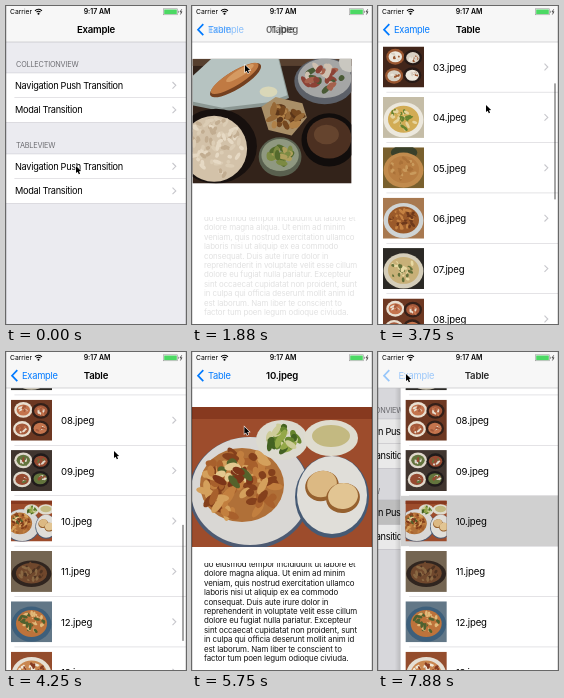
An HTML page with a canvas that plays this animation: 180 by 318 pixels, repeating every 8000 ms.

```html
<!DOCTYPE html>
<html lang="en">
<head>
<meta charset="utf-8">
<title>List transition</title>
<style>
html, body { margin: 0; width: 100%; height: 100%; overflow: hidden; background: #fff; }
canvas { display: block; width: 180px; height: 318px; }
</style>
</head>
<body>
<canvas id="stage"></canvas>
<script>
const W = 180, H = 318, LOOP = 8000, NAV = 36, ROW = 50.4, ROWS = 14, THUMB = 41;
const BLUE = '#007aff';
const canvas = document.getElementById('stage');
const dpr = window.devicePixelRatio || 1;
canvas.width = W * dpr;
canvas.height = H * dpr;
const g = canvas.getContext('2d');

const clamp = v => Math.max(0, Math.min(1, v));
const ease = v => { v = clamp(v); return v * v * (3 - 2 * v); };
const mix = (a, b, p) => a + (b - a) * p;

function rect(x, y, w, h, color) {
  g.fillStyle = color;
  g.fillRect(x, y, w, h);
}

function text(str, x, y, size, { color = '#000', weight = 400, gap = -0.2, align = 'left', alpha = 1 } = {}) {
  if (alpha <= 0) return;
  g.save();
  g.globalAlpha = Math.min(1, alpha);
  g.font = `${weight} ${size}px Inter, Roboto, sans-serif`;
  g.letterSpacing = gap + 'px';
  g.textAlign = align;
  g.textBaseline = 'alphabetic';
  g.fillStyle = color;
  g.fillText(str, x, y + size * 0.36);
  g.restore();
}

function line(points, color, width) {
  g.beginPath();
  points.forEach(([x, y]) => g.lineTo(x, y));
  g.strokeStyle = color;
  g.lineWidth = width;
  g.stroke();
}

function shape(points, color) {
  g.beginPath();
  points.forEach(([x, y]) => g.lineTo(x, y));
  g.fillStyle = color;
  g.fill();
}

function oval(x, y, rx, ry, color, turn = 0) {
  g.beginPath();
  g.ellipse(x, y, rx, ry, turn, 0, 7);
  g.fillStyle = color;
  g.fill();
}

const disclosure = y => line([[166.5, y - 3.3], [169.8, y], [166.5, y + 3.3]], '#c7c7cc', 1.1);

// Small scattered bits of food inside an ellipse
function bits(seed, n, x, y, rx, ry, size, colors) {
  const rnd = () => (seed = (seed * 16807) % 2147483647) / 2147483647;
  for (let i = 0; i < n; i++) {
    const a = rnd() * 6.283, r = Math.sqrt(rnd());
    oval(x + Math.cos(a) * r * rx, y + Math.sin(a) * r * ry, size * (0.6 + rnd()), size * 0.6, colors[i % colors.length], rnd() * 3);
  }
}

function fishMeal() {
  rect(0, 0, 180, 140, '#33231a');
  rect(0, 0, 180, 8, '#57402f');
  shape([[0, 22], [22, 0], [98, 0], [109, 44], [86, 53], [34, 59], [0, 52]], '#8b9793');
  shape([[0, 20], [22, 0], [97, 0], [107, 41], [84, 49], [34, 55], [0, 48]], '#b6c3c1');
  oval(49, 24, 33, 10, '#74401f', -0.55);
  oval(48, 22, 31, 8, '#c07a43', -0.55);
  oval(54, 16, 18, 4, '#d59a62', -0.55);
  oval(86, 37, 10, 6, '#d9d7b8');
  oval(149, 25, 34, 26, '#5c6068');
  oval(149, 22, 30, 22, '#a5a6a5');
  bits(9, 26, 147, 22, 21, 14, 5, ['#8c4236', '#cfc0b0', '#495a35', '#a5614c']);
  oval(177, 4, 12, 11, '#c9c7c0');
  shape([[78, 54], [94, 43], [124, 50], [129, 66], [112, 86], [86, 80]], '#a98f68');
  bits(4, 38, 103, 65, 18, 13, 5, ['#74471f', '#966836', '#5a3519', '#b08148']);
  oval(27, 98, 46, 42, '#17100e');
  oval(25, 101, 37, 37, '#d3c2a9');
  bits(7, 80, 24, 100, 33, 33, 3.5, ['#e6d9c4', '#c2ad91', '#dccdb5']);
  oval(99, 110, 24, 22, '#59604f');
  oval(99, 108, 21, 18, '#8f9880');
  bits(6, 26, 99, 108, 13, 10, 5, ['#546a2c', '#7c8a42', '#ae9f5c']);
  oval(154, 91, 31, 30, '#110d0c');
  oval(154, 89, 25, 23, '#4c3021');
  oval(151, 85, 14, 11, '#65442e');
}

function pastaMeal() {
  rect(0, 0, 180, 140, '#9d4c2c');
  rect(0, 0, 180, 12, '#87391f');
  oval(58, 86, 61, 56, '#4d5a72');
  oval(58, 84, 59, 54, '#d9d7d4');
  oval(50, 78, 42, 37, '#b07038');
  bits(11, 90, 49, 77, 38, 33, 6, ['#a8602c', '#d4a05c', '#84401c', '#c27f3f']);
  bits(3, 18, 42, 70, 18, 15, 6, ['#e3c88f', '#55622b', '#7c3519']);
  oval(90, 33, 26, 20, '#dcdacf');
  bits(5, 32, 90, 31, 18, 12, 5, ['#66852e', '#94a848', '#446222', '#cdcc98']);
  oval(139, 31, 27, 18, '#dfdccf');
  oval(139, 29, 19, 11, '#c3b981');
  oval(140, 90, 37, 41, '#465a74');
  oval(140, 88, 35, 39, '#e0ded9');
  oval(130, 79, 17, 15, '#96612f', -0.3);
  oval(130, 77, 15, 13, '#dcb983', -0.3);
  oval(151, 91, 17, 15, '#96612f', -0.2);
  oval(151, 89, 15, 13, '#e2c593', -0.2);
}

// table, plate, food, accent, accent
const dishes = {
  2: ['#50301f', '#d8d3cb', '#8b5a30', '#e4d8bd', '#58702f'],
  3: ['#42261a', '#261a16', '#d8d1c4', '#9a5730', '#ece7dc'],
  4: ['#c5bda7', '#ece8dd', '#d2ac55', '#67822f', '#e7d49d'],
  5: ['#79602e', '#c18b4d', '#b87e42', '#c99a5c', '#aa7138'],
  6: ['#a87950', '#cfd4d5', '#9b5a2a', '#6e391b', '#c58242'],
  7: ['#2b2925', '#d4cdb9', '#c8b078', '#e7d9a3', '#637039'],
  8: ['#6d3822', '#342019', '#a5593a', '#e9dfd0', '#c4744d'],
  9: ['#40352f', '#201b1b', '#964a31', '#dfd8cc', '#63743d'],
  11: ['#746552', '#30251f', '#70482d', '#4d3221', '#8a6843'],
  12: ['#627787', '#3d5f7b', '#bd733b', '#e0b979', '#4e612f'],
  13: ['#944d2d', '#e5dfd4', '#c9864f', '#f0e7d6', '#863b22'],
  14: ['#503a2c', '#cfc7b7', '#aa7444', '#d9ba7d', '#5e6d35']
};

function genericMeal(i) {
  const [table, plate, food, a, b] = dishes[i];
  rect(0, 0, 180, 140, table);
  if (i === 3 || i === 8 || i === 9) {
    [[62, 35], [122, 38], [58, 100], [120, 98]].forEach(([x, y], n) => {
      oval(x, y, 31, 27, n % 2 ? plate : a);
      oval(x, y, 23, 19, n % 3 ? food : b);
      bits(i + n + 1, 9, x, y, 16, 13, 6, [a, food, b]);
    });
    return;
  }
  if (i === 5) oval(92, 18, 45, 25, '#39402a');
  oval(90, 78, 68, i === 11 ? 45 : 60, plate);
  oval(90, 76, 53, i === 11 ? 35 : 46, food);
  bits(i * 31, 40, 90, 74, 44, i === 11 ? 26 : 36, 8, [food, a, b]);
}

function photo(i, x, y, w, h) {
  const k = Math.max(w / 180, h / 140);
  g.save();
  g.beginPath();
  g.rect(x, y, w, h);
  g.clip();
  g.translate(x + w / 2, y + h / 2);
  g.scale(k, k);
  g.translate(-90, -70);
  if (i === 1) fishMeal();
  else if (i === 10) pastaMeal();
  else genericMeal(i);
  g.restore();
}

function menu(pressed) {
  rect(0, NAV, W, H - NAV, '#ebebf0');
  [['COLLECTIONVIEW', 67], ['TABLEVIEW', 148]].forEach(([name, top], n) => {
    text(name, 10, top - 8.5, 7.3, { color: '#6d6d72' });
    rect(0, top, W, 49.2, '#fff');
    if (n && pressed) rect(0, top, W, 24.6, '#d0d0d0');
    rect(0, top - 0.3, W, 0.5, '#c8c7cc');
    rect(8.4, top + 24.4, W, 0.5, '#c8c7cc');
    rect(0, top + 49, W, 0.5, '#c8c7cc');
    ['Navigation Push Transition', 'Modal Transition'].forEach((label, r) => {
      const y = top + 12.3 + r * 24.6;
      text(label, 9, y, 9.2, { gap: -0.3 });
      disclosure(y);
    });
  });
}

const rowY = (i, scroll) => NAV + ROW * (i - 0.5) - scroll;

function list(scroll, selected, hidden) {
  rect(0, NAV, W, H - NAV, '#fff');
  for (let i = 1; i <= ROWS; i++) {
    const y = rowY(i, scroll);
    if (y < 5 || y > H + 30) continue;
    if (i === selected) rect(0, y - ROW / 2, W, ROW, '#d0d0d0');
    rect(8.4, y + ROW / 2 - 0.3, W, 0.5, '#c8c7cc');
    if (i !== hidden) photo(i, 5, y - THUMB / 2, THUMB, THUMB);
    text(String(i).padStart(2, '0') + '.jpeg', 55, y + 0.5, 9.6, { gap: -0.15 });
    disclosure(y);
  }
}

const body = [
  'do eiusmod tempor incididunt ut labore et',
  'dolore magna aliqua. Ut enim ad minim',
  'veniam, quis nostrud exercitation ullamco',
  'laboris nisi ut aliquip ex ea commodo',
  'consequat. Duis aute irure dolor in',
  'reprehenderit in voluptate velit esse cillum',
  'dolore eu fugiat nulla pariatur. Excepteur',
  'sint occaecat cupidatat non proident, sunt',
  'in culpa qui officia deserunt mollit anim id',
  'est laborum. Nam liber te conscient to',
  'factor tum poen legum odioque civiuda.'
];

function article(alpha) {
  g.save();
  g.beginPath();
  g.rect(0, 211, W, H);
  g.clip();
  body.forEach((s, n) => text(s, 12, 212.2 + n * 9.4, 7.9, { alpha, color: '#111', gap: -0.1 }));
  g.restore();
}

function title(str, x, alpha) {
  text(str, x, 23.5, 9.6, { weight: 600, align: 'center', alpha });
}

function back(str, x, alpha) {
  text(str, x, 23.7, 9.3, { color: BLUE, alpha, gap: -0.25 });
}

function chevron(alpha) {
  g.save();
  g.globalAlpha = clamp(alpha);
  line([[11.3, 18.2], [6, 23.7], [11.3, 29.2]], BLUE, 1.7);
  g.restore();
}

function statusBar() {
  text('Carrier', 4, 5.8, 6.75, { gap: 0 });
  text('9:17 AM', 91, 5.8, 6.9, { weight: 600, align: 'center', gap: 0 });
  g.strokeStyle = '#000';
  g.lineWidth = 1.1;
  [2.7, 4.7].forEach(r => {
    g.beginPath();
    g.arc(32.5, 8, r, -2.4, -0.75);
    g.stroke();
  });
  oval(32.5, 7.7, 1, 1, '#000');
  g.strokeStyle = '#8a8a8a';
  g.lineWidth = 0.5;
  g.strokeRect(157.5, 2.8, 14, 6);
  rect(158.2, 3.5, 12.6, 4.6, '#4cd964');
  rect(172, 4.8, 0.8, 2, '#8a8a8a');
  line([[175.7, 3.3], [174, 6], [176, 5.7], [174.4, 8.5]], '#222', 0.7);
}

const stops = [
  [0, 70, 160], [700, 70, 160], [1350, 53, 59], [1950, 53, 59], [2650, 20, 23], [3150, 20, 23],
  [3600, 108, 99], [4250, 108, 99], [4700, 101, 181], [5250, 101, 181], [6050, 30, 26],
  [6700, 30, 26], [7400, 28, 22], [8000, 28, 22]
];

function pointer(t) {
  const n = stops.findIndex(s => s[0] > t);
  const [t0, x0, y0] = stops[n - 1], [t1, x1, y1] = stops[n];
  const p = ease((t - t0) / (t1 - t0));
  g.save();
  g.translate(mix(x0, x1, p), mix(y0, y1, p));
  g.scale(0.88, 0.88);
  g.beginPath();
  [[0, 0], [0, 8], [1.9, 6.4], [3.2, 9.3], [4.6, 8.7], [3.4, 5.9], [5.8, 5.8]].forEach(q => g.lineTo(...q));
  g.closePath();
  g.strokeStyle = '#fff';
  g.lineWidth = 1.2;
  g.stroke();
  g.fillStyle = '#000';
  g.fill();
  g.restore();
}

const visits = [
  { item: 1, open: 1505, close: 3060 },
  { item: 10, open: 4907, close: 6235 }
];
const SPAN = 500;

function detail(v, t, scroll) {
  const u = (t - v.open) / SPAN, c = (t - v.close) / SPAN;
  const p = ease(u) - ease(c);
  if (c > 0) rect(0, NAV, W, H - NAV, `rgba(255,255,255,${1 - clamp(c * 1.2)})`);
  else rect(0, NAV, W, H - NAV, '#fff');
  article(c > 0 ? 1 - c * 4 : u < 1 ? u * u * 0.22 : 0.22 + (u - 1) * 1.4);
  const w = mix(THUMB, 180, p), h = mix(THUMB, 140, p);
  photo(v.item, mix(25.5, 90, p) - w / 2, mix(rowY(v.item, scroll), 125, p) - h / 2, w, h);
  return c > 0 ? 1 - clamp(c) : clamp(u) ** 2;
}

function draw(t) {
  g.setTransform(dpr, 0, 0, dpr, 0, 0);
  rect(0, 0, W, H, '#fff');
  const k = ease((t - 250) / SPAN) - ease((t - 7770) / SPAN);
  const scroll = 345.8 * ease((t - 3490) / 730);
  const selected = t > 4780 ? 10 : t > 1400 ? 1 : 0;
  const visit = visits.find(v => t >= v.open && t < v.close + SPAN);
  let m = 0;

  if (k < 1) {
    g.save();
    g.translate(-54 * k, 0);
    menu(t > 130);
    g.restore();
    rect(0, NAV, W, H, `rgba(0,0,0,${0.1 * k})`);
  }
  if (k > 0) {
    const x = W * (1 - k);
    if (x > 0) {
      const shade = g.createLinearGradient(x - 6, 0, x, 0);
      shade.addColorStop(0, 'rgba(0,0,0,0)');
      shade.addColorStop(1, 'rgba(0,0,0,.14)');
      rect(x - 6, NAV, 6, H, shade);
    }
    g.save();
    g.translate(x, 0);
    list(scroll, selected, visit && visit.item);
    g.restore();
    if (visit) m = detail(visit, t, scroll);
  }

  const bar = clamp((t - 3500) / 100) * clamp((4600 - t) / 250);
  if (bar > 0) rect(176, 38 + scroll * 0.39, 2, 116, `rgba(0,0,0,${0.35 * bar})`);

  rect(0, 0, W, NAV, '#f7f7f7');
  rect(0, NAV - 0.3, W, 0.6, '#b8b8bc');
  statusBar();

  const q = 1 - k;
  const pressedDetail = visit && t > visit.close - 120;
  const press = pressedDetail ? 0.3 : t > 7650 ? 0.45 : 1;
  chevron(k * (pressedDetail ? mix(0.6, 0.3, m) : press));
  title('Example', 90 - 57 * k, 1 - k * 2);
  title('Table', 90 + 70 * q, (1 - q * 1.3) * (1 - m));
  back('Example', 16 + 35 * q, (t > 7650 ? 0.45 : 1) * (1 - m) * (1 - q * 1.4));
  if (visit) {
    title(String(visit.item).padStart(2, '0') + '.jpeg', 90, m);
    back('Table', 16, m * press);
  }
  rect(0, 0, 0.5, H, 'rgba(0,0,0,.25)');
  rect(W - 0.5, 0, 0.5, H, 'rgba(0,0,0,.25)');
  pointer(t);
}

function tick() {
  draw(performance.now() % LOOP);
  requestAnimationFrame(tick);
}
tick();
</script>
</body>
</html>
```
